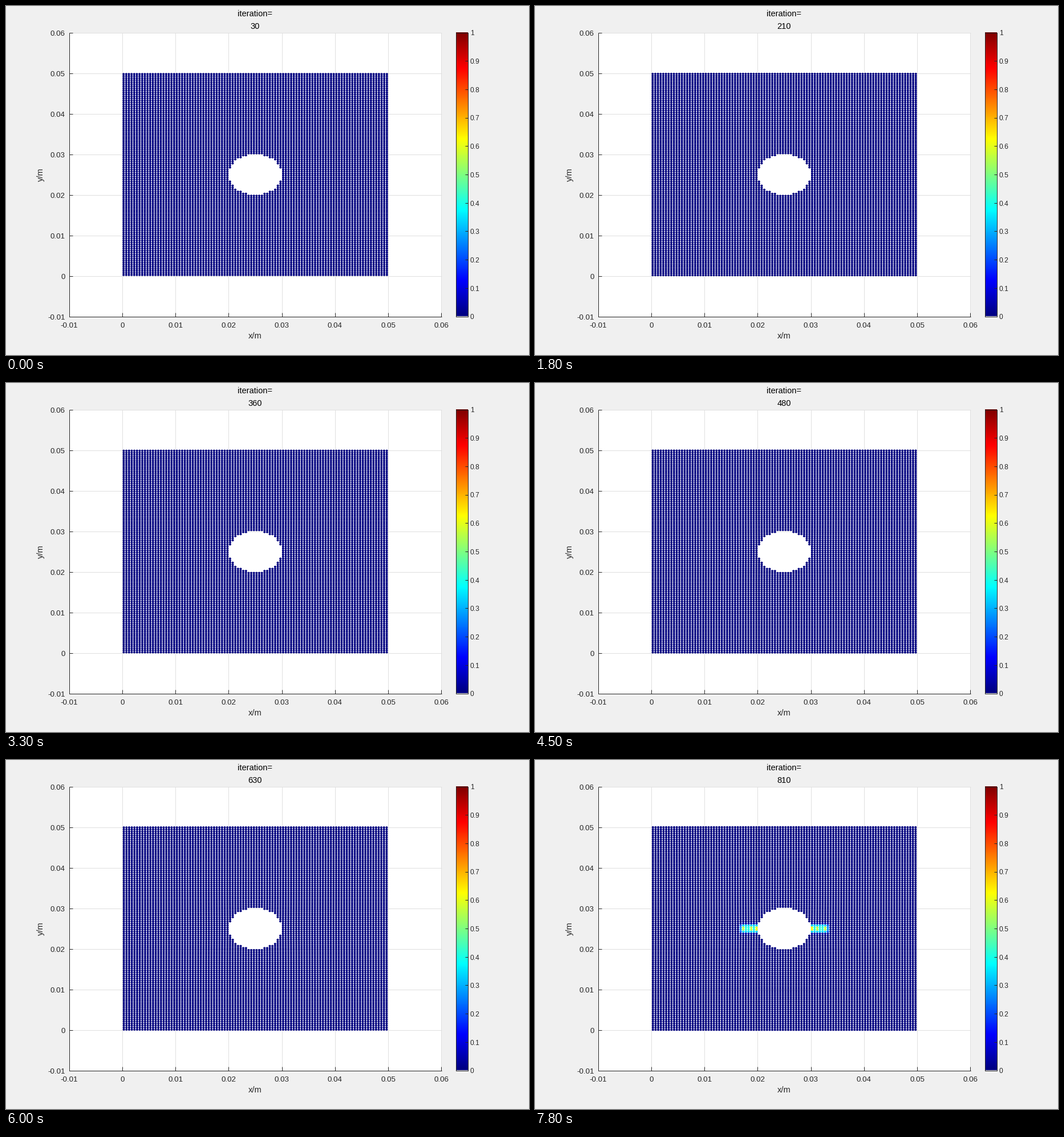
A matplotlib script for the animation above (8000 ms loop, 917 by 611 pixels).

```python
import numpy as np
import matplotlib.pyplot as plt
from matplotlib.animation import FuncAnimation
from matplotlib.patches import Rectangle

W, H, DPI = 917, 611, 64
PT = 72 / DPI                     # points per pixel
DARK, GRID = "#262626", "#dfdfdf"
LEFT, RIGHT, TOP, BOTTOM = 110.5, 763.5, 46.5, 543.5
BAR_L, BAR_R = 788.5, 809.5
RADIUS, HALF, NU = 5.0, 25.0, 1 / 3     # plate sizes in mm
RATE = 2.7541e-4                  # edge travel in mm per iteration
CRACK_START = 660

plt.rcParams["font.family"] = "Liberation Sans"
fig = plt.figure(figsize=(W / DPI, H / DPI), dpi=DPI, facecolor="#f0f0f0")
ax = fig.add_axes([0, 0, 1, 1])
ax.axis("off")


def px(x):
    return LEFT + (x + 0.01) / 0.07 * (RIGHT - LEFT)


def py(y):
    return BOTTOM - (y + 0.01) / 0.07 * (BOTTOM - TOP)


def line(xs, ys, color=DARK, z=2):
    ax.plot(xs, ys, color=color, lw=PT, zorder=z, solid_capstyle="butt")


def label(x, y, text, size, color=DARK, ha="center", **kw):
    kw.setdefault("va", "baseline")
    return ax.text(x, y, text, fontsize=size * PT, color=color, ha=ha, **kw)


def jet(v):
    v = np.asarray(v, float)[..., None]
    return np.clip(1.5 - np.abs(4 * v - np.array([3, 2, 1])), 0, 1)


def draw_axes():
    ax.add_patch(Rectangle((LEFT, TOP), RIGHT - LEFT, BOTTOM - TOP,
                           fc="white", ec="none", zorder=0))
    for i in range(8):
        v = (i - 1) / 100
        x, y = px(v), py(v)
        line([x, x], [TOP, BOTTOM], GRID, 1)
        line([LEFT, RIGHT], [y, y], GRID, 1)
        line([x, x], [BOTTOM, BOTTOM - 6.5])
        line([LEFT, LEFT + 6.5], [y, y])
        label(x, 563, f"{v:g}", 13.33)
        label(103.5, y + 5.3, f"{v:g}", 13.33, ha="right")
    line([LEFT, LEFT, RIGHT], [TOP, BOTTOM, BOTTOM])
    label(436.5, 582.5, "x/m", 14.67)
    label(61, 295, "y/m", 14.67, rotation=90, va="center")
    label(436.7, 18, "iteration=", 14.67, "black")


def draw_colorbar():
    ramp = jet(np.linspace(1, 0, 256))[:, None, :]
    ax.imshow(ramp, extent=(BAR_L, BAR_R, BOTTOM, TOP), aspect="auto",
              interpolation="nearest", zorder=1)
    line([BAR_L, BAR_R, BAR_R, BAR_L, BAR_L],
         [TOP, TOP, BOTTOM, BOTTOM, TOP])
    for i in range(11):
        y = BOTTOM - i / 10 * (BOTTOM - TOP)
        line([BAR_R - 5, BAR_R], [y, y])
        label(814, y + 4.8, f"{i / 10:g}", 12, ha="left")


def displaced(it):
    """Elastic stretch of a plate with a round hole, pulled along y."""
    q = (RADIUS / r) ** 2
    e = RATE * it / HALF / 1.1
    ur = e * r / 2 * (1 - NU + (1 + NU) * q
                      + (1 + NU + 4 * q - (1 + NU) * q * q) * np.cos(2 * th))
    ut = -e * r / 2 * (1 + NU + 2 * (1 - NU) * q
                       + (1 + NU) * q * q) * np.sin(2 * th)
    x = X + ur * np.sin(th) + ut * np.cos(th)
    y = Y + ur * np.cos(th) - ut * np.sin(th)
    return np.column_stack([px((x + HALF) / 1000), py((y + HALF) / 1000)])


def damage(it):
    """Two cracks run sideways from the hole along the middle rows."""
    reach = 3.5 * (it - CRACK_START) / 150
    s = np.abs(X) - RADIUS
    tip = reach - s
    ramp = np.where((tip > 0) & (s > 0), np.clip(tip + 0.4, 0, 1), 0)
    inner = 0.46 + 0.1 * np.cos(2 * np.pi * (s - 1.25) / 1.5)
    inner += np.where(s < 0.5, 0.2, 0)
    row = np.abs(Y)
    level = np.select([row < 0.5, row < 1, row < 1.5], [inner, 0.33, 0.036], 0)
    return ramp * level


axis = (np.arange(100) + 0.5) * 0.5 - HALF
X, Y = (g.ravel() for g in np.meshgrid(axis, axis, indexing="ij"))
solid = np.hypot(X, Y) > RADIUS
X, Y = X[solid], Y[solid]
r, th = np.hypot(X, Y), np.arctan2(X, Y)     # angle from the pull axis

draw_axes()
draw_colorbar()
ax.set_xlim(0, W)
ax.set_ylim(H, 0)
start = displaced(0)
dots = ax.scatter(start[:, 0], start[:, 1], s=(4 * PT) ** 2,
                  c=jet(np.zeros(len(X))), linewidths=0, zorder=3)
counter = label(436.7, 40, "30", 14.67, "black")


def update(frame):
    it = 30 * (frame // 3 + 1)
    counter.set_text(str(it))
    dots.set_offsets(displaced(it))
    dots.set_facecolor(jet(damage(it)))
    return dots, counter


anim = FuncAnimation(fig, update, frames=80, interval=100,
                     repeat=True, repeat_delay=0, blit=False)
plt.show()
```
